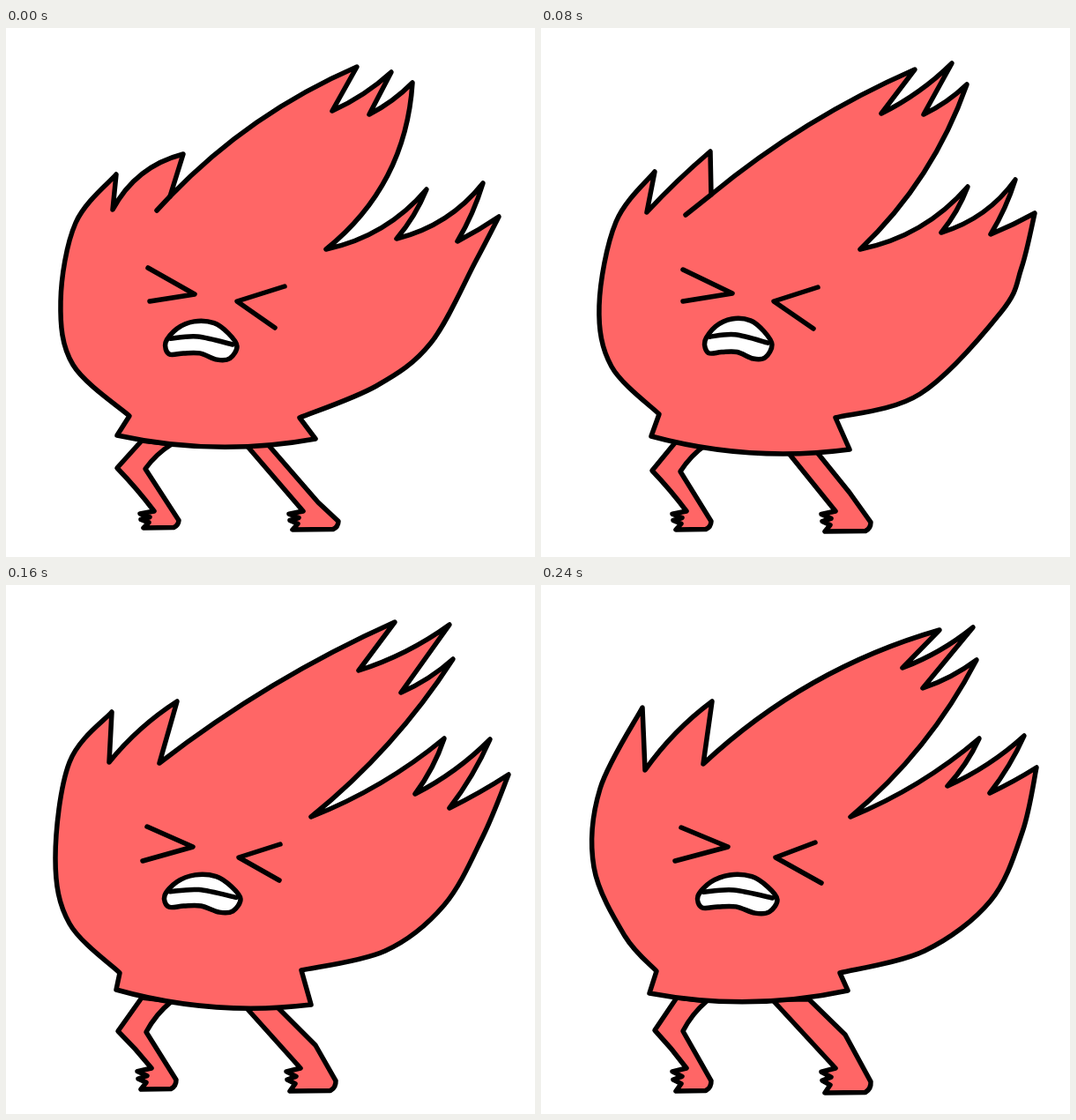
Animation of 600x600 px, one loop 320 ms. Source, as an HTML page with a canvas:

```html
<!DOCTYPE html>
<html lang="en">
<head>
<meta charset="utf-8">
<title>Flame in the wind</title>
<style>
  html, body { margin: 0; height: 100%; overflow: hidden; background: #fff; }
  canvas { display: block; width: 100vw; height: 100vh; }
</style>
</head>
<body>
<canvas id="stage" width="600" height="600"></canvas>
<script>
const POSE_MS = 80;
const RED = "#f66";
const ctx = document.getElementById("stage").getContext("2d");
let pen;

function toPoints(flat) {
  return Array.from({ length: flat.length / 2 }, (_, i) => flat.slice(2 * i, 2 * i + 2));
}

function begin(point) {
  ctx.beginPath();
  ctx.moveTo(...point);
  pen = point;
}

// A positive bend pushes the edge outward on a clockwise outline.
function edge(x, y, bend = 0) {
  const [px, py] = pen;
  ctx.quadraticCurveTo((px + x) / 2 + bend * (y - py), (py + y) / 2 - bend * (x - px), x, y);
  pen = [x, y];
}

function edges(points, bends = []) {
  points.forEach(([x, y], i) => edge(x, y, bends[i]));
}

// Catmull-Rom curve from the pen through the points.
function smooth(points, closed = false) {
  const all = [pen, ...points];
  const count = all.length;
  const at = i => closed ? all[(i + count) % count] : all[Math.max(0, Math.min(count - 1, i))];
  for (let i = 0; i < count - (closed ? 0 : 1); i++) {
    const [a, b, c, d] = [at(i - 1), at(i), at(i + 1), at(i + 2)];
    ctx.bezierCurveTo(
      b[0] + (c[0] - a[0]) / 6, b[1] + (c[1] - a[1]) / 6,
      c[0] - (d[0] - b[0]) / 6, c[1] - (d[1] - b[1]) / 6, ...c);
    pen = c;
  }
}

function paint(fill) {
  ctx.closePath();
  ctx.fillStyle = fill;
  ctx.fill();
  ctx.stroke();
}

function line(...flat) {
  const [first, ...rest] = toPoints(flat);
  begin(first);
  edges(rest);
  ctx.stroke();
}

function foot(x, y, height, heel) {
  const toes = [[-16, .15], [-5, .36], [-15, .5], [-6, .68], [-12, 1], [heel - 6, .98]];
  edges(toes.map(([dx, dy]) => [x + dx, y + dy * height]));
  edge(x + heel, y + height * .55, -.3);
}

function legs({ ankle, height, knee, hip, calf }) {
  const [kneeX, kneeY] = knee;
  const y = 548;
  begin([154, 468]);
  edges([[kneeX, kneeY], [ankle, y]], [0, .03]);
  foot(ankle, y, height, 28);
  edges([[kneeX + 32, kneeY + 1], [188, 472]], [0, .1]);
  paint(RED);

  const [hipLeft, hipRight] = hip;
  begin([hipLeft - 6, 470]);
  edge(ankle + 169, y);
  foot(ankle + 169, y, height + 2, 40);
  edges([calf, [hipRight - 7, 470]]);
  paint(RED);
}

function body({ crown, mane, belly, skirt, back, tuft, bends }) {
  const [crownBend, fallBend, maneBend, tuftBend] = bends;
  const [root, ...tips] = toPoints(crown);
  const [waist, ...hem] = toPoints(skirt);
  const [tuftTip, ...tuftRest] = toPoints(tuft);
  begin(root);
  edges(tips, [crownBend, 0, -.08, 0, -.08]);
  edges(toPoints(mane), [fallBend, maneBend, .08, maneBend, .06, -.03]);
  smooth([...toPoints(belly), waist]);
  edges(hem, [0, .1, 0]);
  smooth([...toPoints(back), tuftTip]);
  edges([...tuftRest, root], [0, tuftBend, 0]);
  paint(RED);
}

function mouth(x, y, width, height) {
  const place = flat => toPoints(flat).map(([u, v]) => [x + u * width, y + v * height]);
  const [first, ...lips] = place([
    0, .55, .16, .2, .4, .02, .68, .06, .88, .32, 1, .64,
    .9, .95, .72, .98, .48, .82, .25, .82, .05, .84]);
  begin(first);
  smooth(lips, true);
  paint("#fff");
  const [left, ...teeth] = place([.07, .45, .45, .4, .94, .6]);
  begin(left);
  smooth(teeth);
  ctx.stroke();
}

function braced() {
  legs({ ankle: 168, height: 19, knee: [126, 499], hip: [276, 302], calf: [354, 538] });
  body({
    crown: [186, 191, 398, 44, 370, 94, 437, 50, 412, 98, 461, 62],
    mane: [363, 251, 477, 183, 443, 239, 541, 176, 512, 242, 559, 214],
    belly: [533, 264, 482, 357, 420, 406],
    skirt: [333, 442, 351, 466, 126, 462, 140, 440],
    back: [76, 382, 62, 310, 79, 221],
    tuft: [125, 166, 121, 206, 201, 143],
    bends: [.1, .22, -.17, .22]
  });
  line(171, 207, 186, 191);
  mouth(181, 332, 81, 45);
  line(161, 272, 214, 302, 163, 310);
  line(316, 293, 262, 310, 305, 340);
}

function lifted() {
  legs({ ankle: 165, height: 21, knee: [126, 502], hip: [277, 311], calf: [350, 527] });
  body({
    crown: [193, 189, 424, 47, 386, 97, 466, 40, 434, 98, 483, 64],
    mane: [362, 251, 484, 180, 454, 232, 538, 172, 510, 234, 560, 210],
    belly: [545, 272, 522, 322, 430, 415],
    skirt: [334, 442, 350, 478, 125, 463, 134, 438],
    back: [80, 384, 66, 315, 85, 220],
    tuft: [129, 163, 120, 209, 192, 140],
    bends: [.07, .12, -.17, .03]
  });
  line(164, 212, 193, 189);
  mouth(186, 329, 76, 47);
  line(161, 274, 217, 301, 161, 310);
  line(314, 294, 264, 310, 309, 341);
}

function stretched() {
  legs({ ankle: 165, height: 24, knee: [127, 506], hip: [270, 306], calf: [351, 522] });
  body({
    crown: [174, 202, 441, 42, 400, 97, 503, 45, 448, 122, 507, 84],
    mane: [346, 263, 497, 174, 464, 237, 549, 175, 503, 253, 570, 215],
    belly: [541, 285, 497, 363, 430, 415],
    skirt: [335, 437, 346, 476, 125, 459, 129, 440],
    back: [72, 384, 56, 310, 72, 201],
    tuft: [120, 144, 117, 201, 194, 132],
    bends: [.06, .08, -.08, .08]
  });
  mouth(180, 328, 86, 44);
  line(160, 274, 212, 297, 155, 313);
  line(311, 294, 264, 309, 310, 335);
}

function settling() {
  legs({ ankle: 165, height: 26, knee: [129, 505], hip: [268, 311], calf: [345, 510] });
  body({
    crown: [184, 203, 452, 51, 410, 94, 490, 48, 433, 117, 494, 85],
    mane: [351, 263, 497, 174, 461, 228, 548, 171, 509, 236, 562, 207],
    belly: [546, 280, 510, 358, 435, 415],
    skirt: [339, 440, 348, 460, 123, 463, 131, 438],
    back: [95, 398, 60, 320, 67, 231],
    tuft: [115, 139, 118, 210, 194, 132],
    bends: [.12, .1, -.08, .08]
  });
  mouth(178, 328, 90, 45);
  line(159, 275, 212, 297, 152, 313);
  line(311, 292, 266, 309, 318, 338);
}

const poses = [braced, lifted, stretched, settling];
const startTime = performance.now();

function tick() {
  const index = Math.floor((performance.now() - startTime) / POSE_MS) % poses.length;
  ctx.clearRect(0, 0, 600, 600);
  poses[index]();
  requestAnimationFrame(tick);
}

ctx.lineWidth = 5.5;
ctx.lineCap = ctx.lineJoin = "round";
tick();
</script>
</body>
</html>
```
